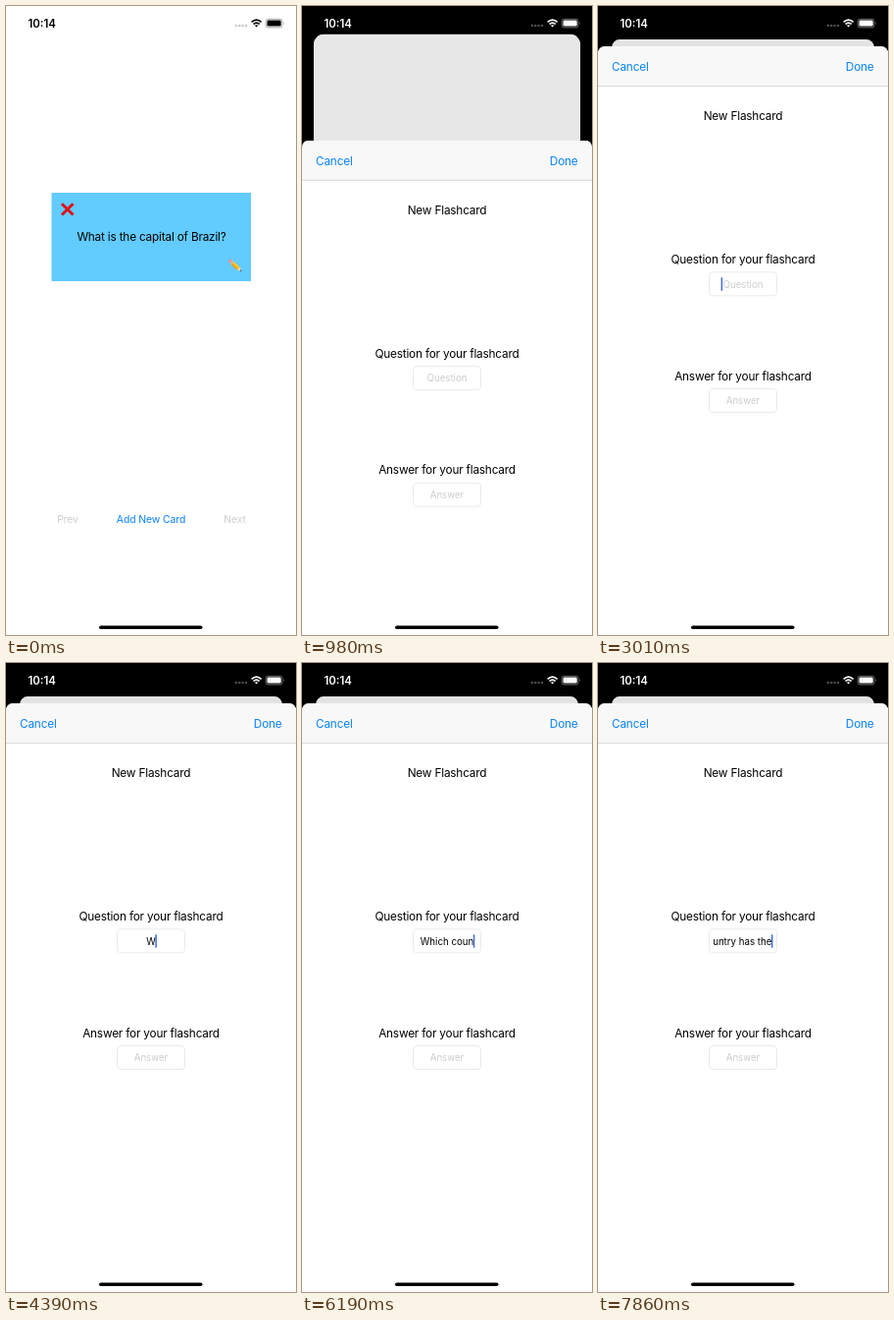
Animation, 296 px wide and 640 px high, one loop 8000 ms. Source, as an HTML page:

```html
<!DOCTYPE html>
<html lang="en">
<head>
<meta charset="utf-8">
<title>Flashcards</title>
<style>
  html, body { margin: 0; width: 100%; height: 100%; overflow: hidden; background: #000; }
  svg { display: block; }
  text { font: 11.8px Inter, sans-serif; letter-spacing: -.19px; text-anchor: middle; white-space: pre; }
  .button { font-size: 10.45px; letter-spacing: -.12px; }
  .field { font-size: 9.7px; letter-spacing: 0; }
  .start { text-anchor: start; }
  .end { text-anchor: end; }
  .clock { font-size: 11.4px; font-weight: 600; letter-spacing: 0; }
  .blue { fill: #0a84f5; }
  .grey { fill: #cdcdd0; }
  .box { fill: #fff; stroke: #e6e6e6; stroke-width: .8; }
</style>
</head>
<body>
<svg width="296" height="640" viewBox="0 0 296 640">
  <clipPath id="screenClip"><rect id="screenShape" width="296" height="640"/></clipPath>
  <clipPath id="sheetClip"><path id="sheetShape"/></clipPath>
  <clipPath id="inputClip"><rect x="117.5" y="230" width="60.5" height="24"/></clipPath>

  <rect width="296" height="640"/>
  <g id="screen"><g clip-path="url(#screenClip)">
    <rect width="296" height="640" fill="#fff"/>
    <rect x="46.5" y="190" width="203.5" height="90" fill="#62cbff"/>
    <path d="M57 201.200l11.500 11.300m0-11.300L57 212.500" stroke="#df1018" stroke-width="3"/>
    <text x="148.500" y="239.300">What is the capital of Brazil?</text>
    <g transform="translate(228 258.500) rotate(43)">
      <rect y="-2" width="3" height="4" rx="1" fill="#ef8b91"/>
      <rect x="2.300" y="-2" width="2" height="4" fill="#b9bec4"/>
      <rect x="4.300" y="-2" width="8.200" height="4" fill="#fcc72e"/>
      <rect x="4.300" y=".6" width="8.200" height="1.400" fill="#e89a21"/>
      <path d="M12.500-2L17 0L12.500 2z" fill="#f3d6a4"/>
      <path d="M15.300-.8L17 0L15.300 .8z" fill="#333"/>
    </g>
    <text class="button grey" x="63" y="526.300">Prev</text>
    <text class="button blue" x="148" y="526.300" id="add">Add New Card</text>
    <text class="button grey" x="233.500" y="526.300">Next</text>
    <rect id="dim" width="296" height="640"/>
  </g></g>

  <g id="sheet"><g clip-path="url(#sheetClip)">
    <rect width="296" height="610" fill="#fff"/>
    <rect width="296" height="40.500" fill="#f8f8f8"/>
    <rect y="40" width="296" height=".8" fill="#d2d2d2"/>
    <text class="blue start" x="14" y="25">Cancel</text>
    <text class="blue end" x="281.500" y="25">Done</text>
    <text x="148" y="75.200">New Flashcard</text>
    <text x="148" y="220.900">Question for your flashcard</text>
    <rect class="box" x="113.500" y="229.800" width="69" height="24" rx="3.500"/>
    <text class="field grey" x="148" y="245.600" id="hint">Question</text>
    <g clip-path="url(#inputClip)"><text class="field start" y="245.600" id="typed"></text></g>
    <rect id="caret" y="235.300" width="1.500" height="13.400" fill="#4169e1"/>
    <text x="148" y="339.600">Answer for your flashcard</text>
    <rect class="box" x="113.500" y="348.500" width="69" height="24" rx="3.500"/>
    <text class="field grey" x="148" y="364.200">Answer</text>
  </g></g>

  <g id="status">
    <text class="clock" x="36.700" y="22">10:14</text>
    <g id="dots"><circle cx="234.800" cy="20" r="1.300"/><circle cx="238.200" cy="20" r="1.300"/><circle cx="241.600" cy="20" r="1.300"/><circle cx="245" cy="20" r="1.300"/></g>
    <g fill="none" stroke="currentColor" stroke-width="1.700">
      <path d="M250.600 16.400q5-4.600 10 0M252.600 18.500q3-2.600 6 0"/>
    </g>
    <path d="M255.600 21.600l-1.700-1.800q1.700-1.200 3.400 0z"/>
    <rect x="265.200" y="13.300" width="16.800" height="8.600" rx="2.400" fill="none" stroke="#8e8e8e" stroke-width=".8"/>
    <rect x="266.500" y="14.600" width="14.200" height="6" rx="1.300"/>
    <path d="M283 16.200q1.300 1.400 0 2.800z" fill="#8e8e8e"/>
  </g>
  <rect x="95" y="630.500" width="105.500" height="3.600" rx="1.800"/>
</svg>
<script>
const LOOP = 8000;
const $ = id => document.getElementById(id);
const set = (id, attrs) => {
  for (const name in attrs) $(id).setAttribute(name, attrs[name]);
};

// [time, sheet progress]
const slide = [[0, 0], [740, .05], [860, .426], [980, .84], [1090, .955], [1210, .993], [1980, 1]];

// [time, number of characters typed]
const phrase = "Which country has the";
const keys = [[0, 0], [4390, 1], [4680, 3], [4830, 4], [5120, 6], [5830, 8], [6020, 9], [6190, 10], [6390, 11],
  [6590, 12], [6700, 13], [7060, 15], [7190, 16], [7340, 17], [7455, 18], [7570, 19], [7740, 20], [7860, 21]];

// [time, caret opacity]
const blink = [[0, 0], [3010, 1], [3790, 0], [4030, .5], [4150, 1]];

const at = (steps, t) => steps.filter(step => step[0] <= t).pop()[1];

function measure(text) {
  $("typed").textContent = text;
  return text ? $("typed").getComputedTextLength() : 0;
}

function drawSlide(t) {
  const p = at(slide, t), r = t < 1980 ? 38 : 0;
  set("screen", { transform: `translate(${14 * p} ${34 * p}) scale(${1 - 28 / 296 * p})` });
  set("screenShape", { rx: p ? 28 - 19 * p : 0 });
  set("dim", { opacity: .11 * p });
  set("add", { opacity: t < 500 ? 1 : .25 });
  set("sheet", { transform: `translate(0 ${41 + 599 * (1 - p)})`, visibility: p ? "visible" : "hidden" });
  set("sheetShape", { d: `M0 8q0-8 8-8H288q8 0 8 8V${599 - r}a${r} ${r} 0 0 1 ${-r} ${r}H${r}a${r} ${r} 0 0 1 ${-r} ${-r}z` });
  const dark = t >= 980;
  set("status", { fill: dark ? "#fff" : "#000", color: dark ? "#fff" : "#000" });
  set("dots", { fill: dark ? "#4c4c4c" : "#c8c8c8" });
}

function drawInput(t) {
  const text = phrase.slice(0, at(keys, t));
  const visible = measure(text.trimEnd()), full = measure(text);
  // Centred until the field is full, then scrolled to keep the end in view.
  const x = Math.min(148 - visible / 2, 177.3 - full);
  set("typed", { x });
  set("hint", { opacity: text ? 0 : 1 });
  set("caret", { x: text ? x + full - .4 : 125.6, opacity: at(blink, t) });
}

function frame() {
  const t = performance.now() % LOOP;
  drawSlide(t);
  drawInput(t);
  requestAnimationFrame(frame);
}
frame();
</script>
</body>
</html>
```
